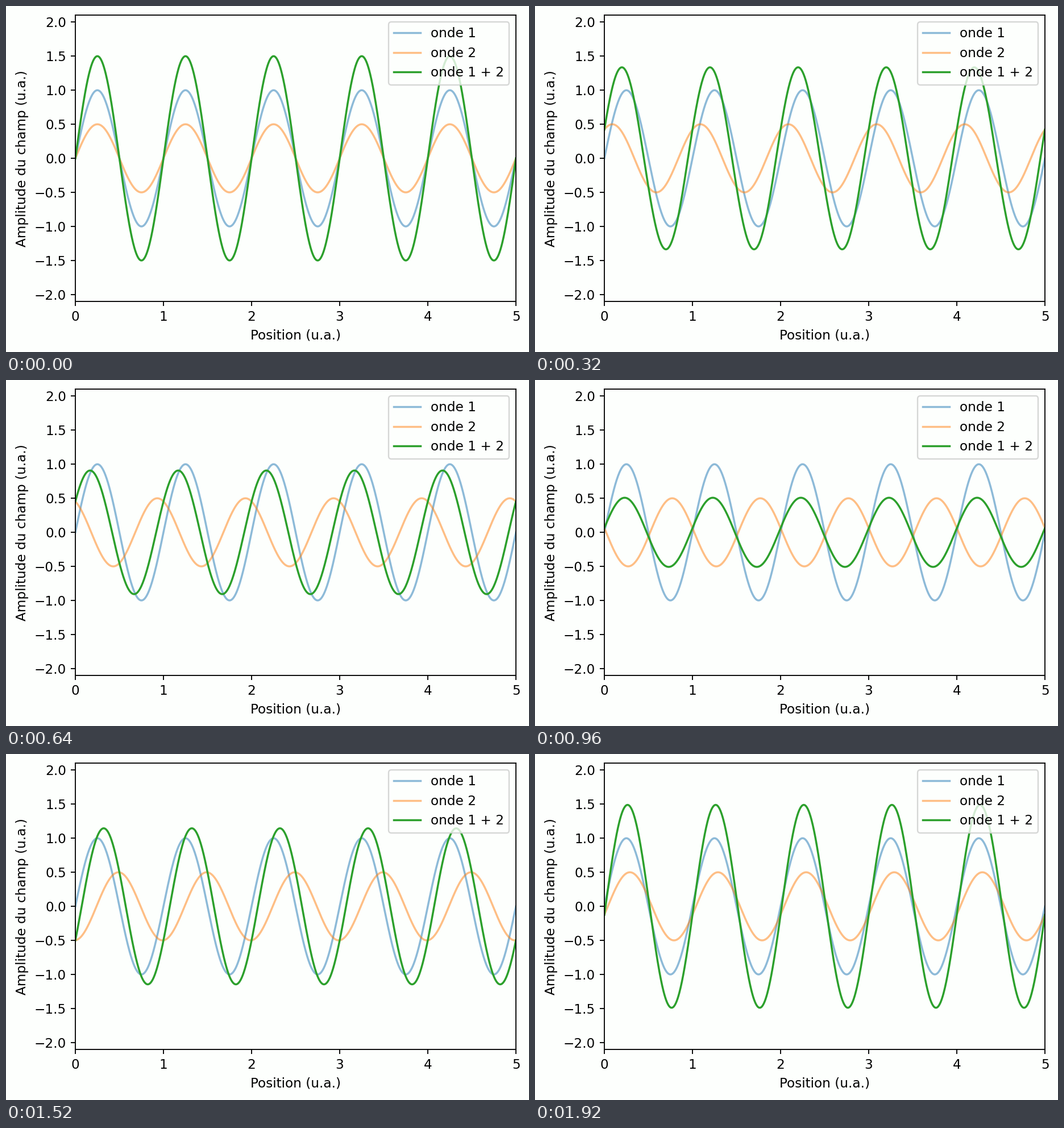
Recreate the animation shown at these times as a matplotlib script. Size 920x609 px, loop 2 s.

```python
import numpy as np
import matplotlib.pyplot as plt
from matplotlib.animation import FuncAnimation

W, H, DPI = 920, 609, 500 / 3
FRAMES, INTERVAL = 25, 80
PAPER = "#fdfffd"

plt.rcParams.update({"font.family": "DejaVu Sans", "font.size": 10})

# The small surplus guards against the pixel size being rounded down
fig = plt.figure(
    figsize=((W + 0.01) / DPI, (H + 0.01) / DPI), dpi=DPI, facecolor=PAPER
)

# Axes box in pixels, measured from the top left
left, top, width, height = 122, 16.4, 775, 503.4
ax = fig.add_axes(
    [left / W, 1 - (top + height) / H, width / W, height / H], facecolor=PAPER
)
ax.set(
    xlim=(0, 5),
    ylim=(-2.1, 2.1),
    xticks=range(6),
    yticks=np.arange(-2, 2.1, 0.5),
    xlabel="Position (u.a.)",
    ylabel="Amplitude du champ (u.a.)",
)

x = np.linspace(0, 5, 1001)


def wave(amp, shift=0.0):
    return amp * np.sin(2 * np.pi * (x + shift))


fixed = wave(1)
ax.plot(x, fixed, color="C0", alpha=0.5, label="onde 1")
(moving_line,) = ax.plot(x, wave(0.5), color="C1", alpha=0.5, label="onde 2")
(sum_line,) = ax.plot(x, fixed + wave(0.5), color="C2", label="onde 1 + 2")
ax.legend(loc="upper right", facecolor=PAPER)


def update(i):
    moving = wave(0.5, i / FRAMES)
    moving_line.set_ydata(moving)
    sum_line.set_ydata(fixed + moving)
    return moving_line, sum_line


anim = FuncAnimation(
    fig, update, frames=FRAMES, interval=INTERVAL, repeat=True, repeat_delay=0
)
plt.show()
```
